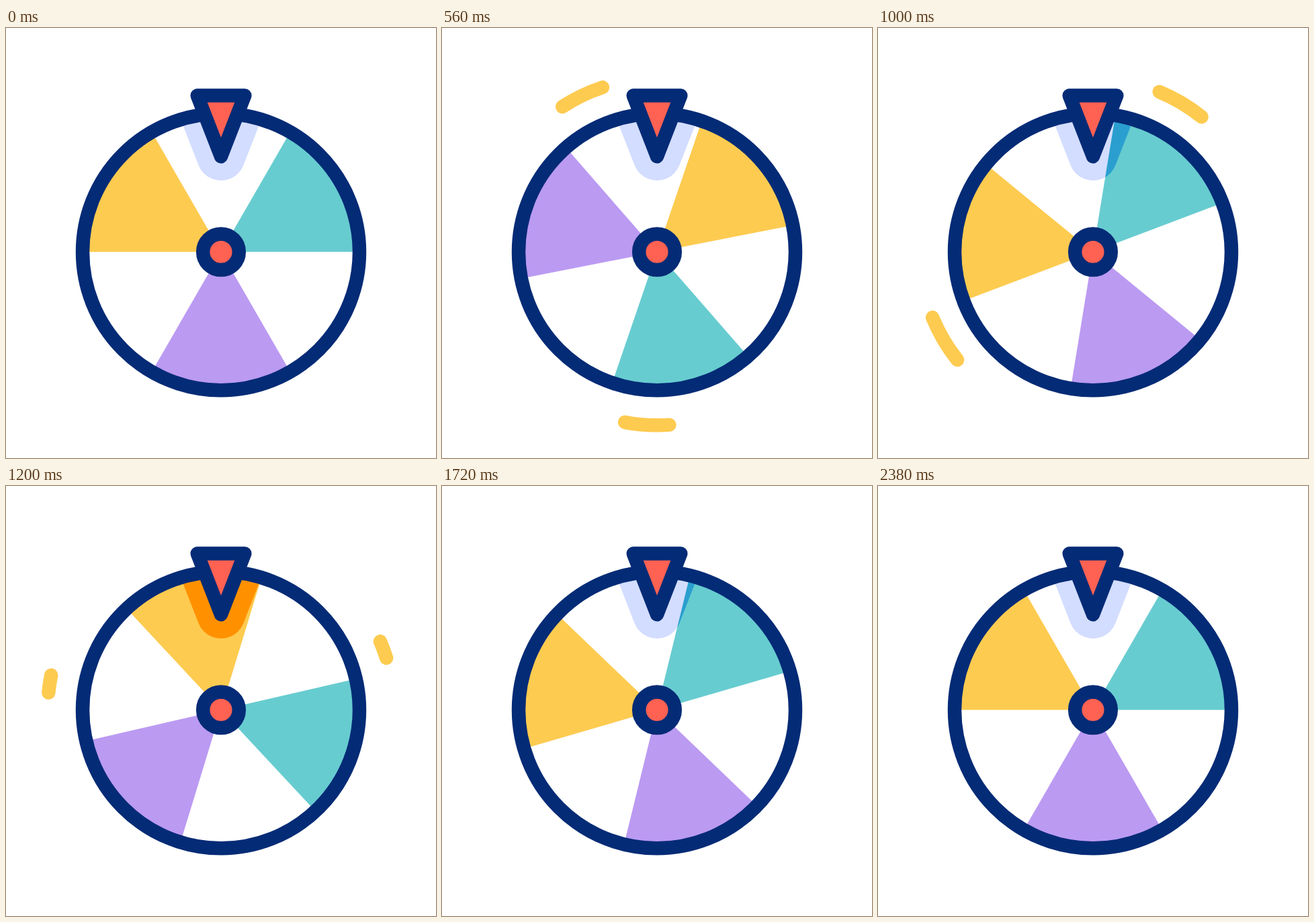
Animation, 640 px wide and 640 px high, one loop 2400 ms. Source, as an HTML page:

```html
<!DOCTYPE html>
<html lang="en">
<head>
<meta charset="utf-8">
<title>Prize wheel</title>
<style>
  html, body { margin: 0; width: 100%; height: 100%; overflow: hidden; background: #fff; }
  svg { display: block; width: 100%; height: 100%; }
</style>
</head>
<body>
<svg viewBox="0 0 640 640">
  <defs>
    <clipPath id="face"><circle cx="320" cy="333.3" r="200"/></clipPath>
    <mask id="shade" maskUnits="userSpaceOnUse" x="0" y="0" width="640" height="640">
      <path d="M284.7 100.5H355.3L320 191Z" fill="#fff" stroke="#fff" stroke-width="72" stroke-linejoin="round"/>
    </mask>
  </defs>
  <rect width="640" height="640" fill="#fff"/>
  <g fill="none" stroke="#fdcb50" stroke-width="20.5" stroke-linecap="round">
    <path id="streakA"/>
    <path id="streakB"/>
  </g>
  <g id="light"></g>
  <g clip-path="url(#face)">
    <g mask="url(#shade)">
      <rect width="640" height="640" fill="#d3ddff"/>
      <g id="dark"></g>
    </g>
  </g>
  <g stroke="#042b76" stroke-width="20.5" stroke-linejoin="round">
    <circle cx="320" cy="333.3" r="206" fill="none"/>
    <circle cx="320" cy="333.3" r="26.8" fill="#ff6152"/>
    <path d="M284.7 100.5H355.3L320 191.3Z" fill="#ff6152"/>
  </g>
</svg>
<script>
  const CX = 320, CY = 333.3, LOOP = 2400, STEP = 20;
  const $ = id => document.getElementById(id);

  // Clockwise degrees, zero at the top
  function polar(r, deg) {
    const a = deg * Math.PI / 180;
    return (CX + r * Math.sin(a)).toFixed(2) + ' ' + (CY - r * Math.cos(a)).toFixed(2);
  }

  const arc = (r, from, to) => `M${polar(r, from)}A${r} ${r} 0 0 1 ${polar(r, to)}`;

  function addSectors(group, colours) {
    group.innerHTML = colours.map((fill, i) => {
      const from = 30 + i * 120;
      return `<path d="${arc(200, from, from + 60)}L${CX} ${CY}Z" fill="${fill}"/>`;
    }).join('');
  }
  addSectors($('light'), ['#67ccd0', '#bb9af2', '#fdcb50']);
  addSectors($('dark'), ['#2a9fcf', '#6b66f8', '#ff9100']);

  // Spin past a full turn, then swing to rest
  const SPIN = [[180, 0], [1320, 420], [1570, 330], [1978, 375], [2380, 360]];
  const HEAD = [[330, -45], [380, -39.4], [720, 1.1], [1000, 38.8], [1300, 90]];
  const TAIL = [[330, -45], [380, -43.8], [720, -20], [1000, 22.5], [1300, 90]];

  const segment = (keys, t) => {
    let i = 0;
    while (i < keys.length - 2 && t >= keys[i + 1][0]) i++;
    return i;
  };

  function eased(keys, t) {
    const i = segment(keys, t), [t0, a] = keys[i], [t1, b] = keys[i + 1];
    const s = Math.min(1, Math.max(0, (t - t0) / (t1 - t0)));
    return a + (b - a) * s * s * (3 - 2 * s);
  }

  // Smooth cubic through the keys
  function smooth(keys, t) {
    const i = segment(keys, t), [t0, a] = keys[i], [t1, b] = keys[i + 1];
    const slope = k => {
      const p = keys[Math.max(0, k - 1)], q = keys[Math.min(keys.length - 1, k + 1)];
      return (q[1] - p[1]) / (q[0] - p[0]);
    };
    const d = t1 - t0, s = (t - t0) / d, u = 1 - s;
    return a * u * u * (1 + 2 * s) + b * s * s * (3 - 2 * s)
      + d * s * u * (slope(i) * u - slope(i + 1) * s);
  }

  function draw(time) {
    const t = Math.floor(time % LOOP / STEP) * STEP;
    const turn = t < 220 ? 0 : eased(SPIN, t);
    for (const id of ['light', 'dark']) {
      $(id).setAttribute('transform', `rotate(${turn.toFixed(3)} ${CX} ${CY})`);
    }
    const visible = t > 330 && t < 1300;
    const tail = smooth(TAIL, t), head = smooth(HEAD, t);
    $('streakA').setAttribute('d', visible ? arc(258, tail, head) : '');
    $('streakB').setAttribute('d', visible ? arc(258, tail + 209, head + 209) : '');
  }

  const start = performance.now();
  function tick() {
    draw(performance.now() - start);
    requestAnimationFrame(tick);
  }
  draw(0);
  requestAnimationFrame(tick);
</script>
</body>
</html>
```
